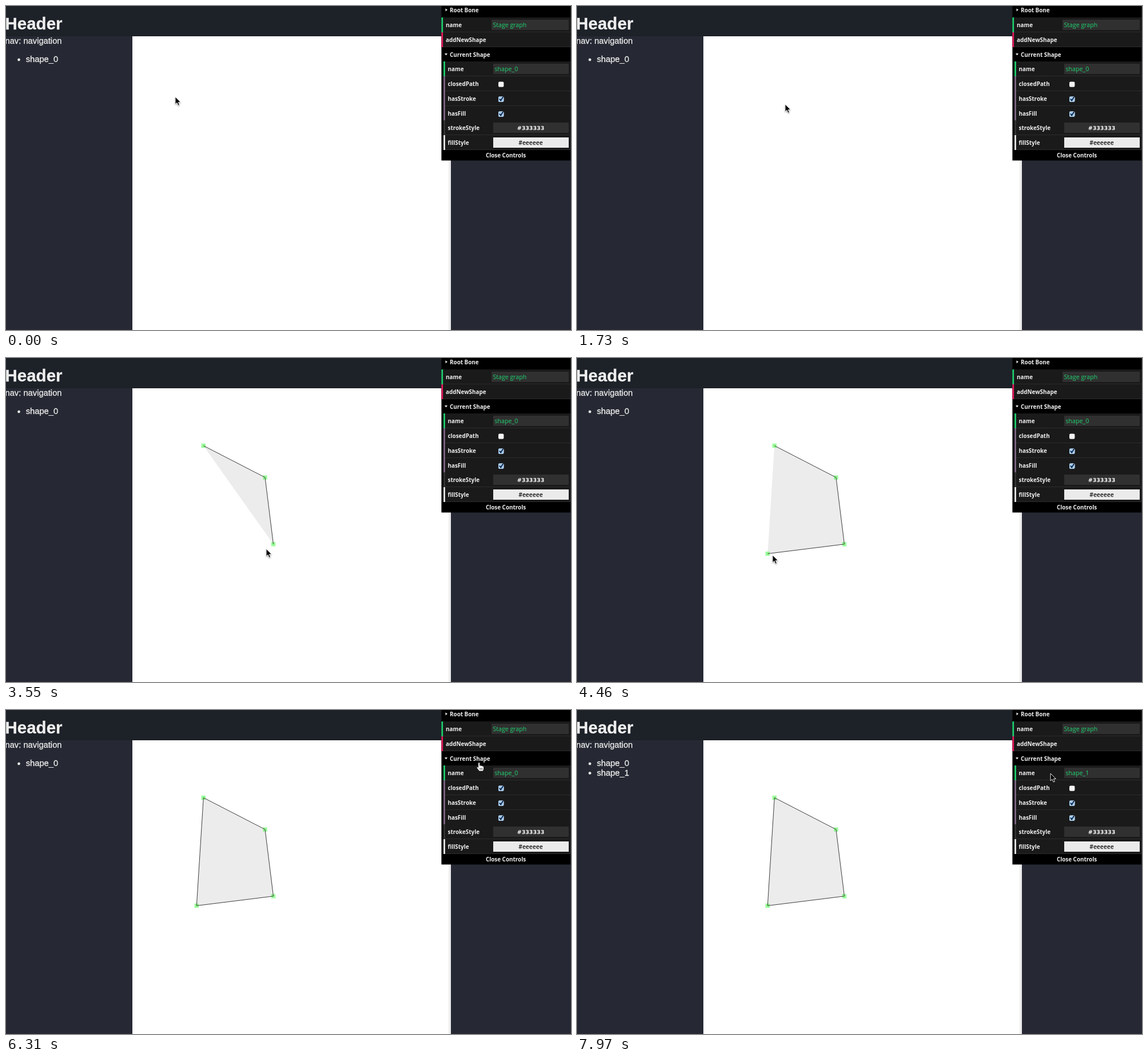
Recreate the animation shown at these times as an HTML page. Size 988 px wide and 567 px high, loop 8 s.

```html
<!DOCTYPE html>
<html lang="en">
<head>
<meta charset="utf-8">
<title>Shape editor</title>
<style>
  html, body { margin: 0; height: 100%; overflow: hidden; background: #262933; }
  svg { display: block; width: 100%; height: 100%; }
  .page { font: 14.72px "Liberation Sans", Arial, sans-serif; fill: #eee; stroke: #eee; stroke-width: .3; }
  .panel { font: 700 9.9px "Open Sans", "Noto Sans", sans-serif; fill: #eee; }
  .value { font-weight: 400; font-size: 10.6px; fill: #1ed36f; }
  .mid { text-anchor: middle; }
  #arrow { filter: drop-shadow(0 1px .8px #0006); }
</style>
</head>
<body>
<svg id="stage" viewBox="0 0 988 567">
  <rect width="988" height="53" fill="#1d2128"/>
  <rect x="221" y="53" width="557" height="514" fill="#ededed"/>
  <rect x="221" y="53" width="553" height="514" fill="#fff"/>

  <g class="page">
    <text x="-1.5" y="41" font-size="29.5" font-weight="700">Header</text>
    <text x="-1.5" y="66">nav: navigation</text>
    <circle cx="22.5" cy="94" r="2.2"/>
    <text x="34.7" y="98">shape_0</text>
    <g id="second">
      <circle cx="22.5" cy="110.5" r="2.2"/>
      <text x="34.7" y="114.5">shape_1</text>
    </g>
  </g>

  <polygon id="fill" fill="#ececec"/>
  <g id="knots" fill="#0f0" fill-opacity=".4"></g>
  <polyline id="line" fill="none" stroke="#333" stroke-width=".95"/>

  <g id="panel" class="panel"></g>

  <path id="arrow" d="M0 0v13l3-2.7 2.1 4.9 2.3-1-2.1-4.7h4.2z" stroke="#fff" stroke-width=".9"/>
  <g id="hand" stroke="#111" stroke-width=".8">
    <path fill="#fff" d="M-1.6 8.5V1.2A1.4 1.4 0 0 1 1.2 1.2V5.2Q3.4 4.4 4 5.8 6 5 6.4 6.6 8.2 6.2 8.2 8V11L6.8 15H.2L-4 9.6Q-4.6 7.4-2.8 7.6Z"/>
    <path d="M1.4 9.5v3M3.4 9.5v3M5.4 9.5v3"/>
  </g>
</svg>
<script>
const $ = id => document.getElementById(id);
const LOOP = 8000, STEP = 86;
const CHECK_AT = 5660, CLOSE_AT = 5870, ADD_AT = 7530;

// Corners of the shape and when each is placed
const POINTS = [
  { at: 2140, pos: [345.3, 153.5] },
  { at: 2690, pos: [453, 209] },
  { at: 3550, pos: [467.5, 325.8] },
  { at: 4460, pos: [333.3, 342.5] }
];

// Pointer strokes: start time, steps, then control and end of a quadratic curve
const HOME = [296, 159];
const STROKES = [
  [360, 9, 402, 140, 340, 137],
  [1370, 5, 350, 160, 364, 172],
  [1800, 5, 392, 196, 346, 153],
  [2260, 10, 500, 190, 449, 284],
  [3120, 4, 453, 310, 466, 325],
  [3550, 9, 419, 370, 333, 342],
  [4460, 1, 338, 344, 342, 345],
  [4550, 3, 440, 335, 537, 314],
  [4900, 8, 740, 240, 863, 137],
  [5870, 10, 845, 92, 788, 72],
  [6740, 4, 792, 66, 791, 60],
  [7530, 6, 800, 0, 828, 111]
];

const GREEN = "#1ed36f", PURPLE = "#806787";
const LEFT = 761.4, RIGHT = 987, PITCH = 25.76;
const ROWS = [
  { kind: "title", label: "Root Bone" },
  { kind: "text", label: "name", edge: GREEN, value: "Stage graph" },
  { kind: "action", label: "addNewShape", edge: "#e61d5f" },
  { kind: "title", label: "Current Shape" },
  { kind: "text", label: "name", edge: GREEN, value: "shape_0" },
  { kind: "check", label: "closedPath", edge: PURPLE },
  { kind: "check", label: "hasStroke", edge: PURPLE },
  { kind: "check", label: "hasFill", edge: PURPLE },
  { kind: "color", label: "strokeStyle", edge: "#333", value: "#333333" },
  { kind: "color", label: "fillStyle", edge: "#eee", value: "#eeeeee" },
  { kind: "close", label: "Close Controls" }
];
const rowTop = i => Math.round(20 + (i - 1) * PITCH);
const rowAt = y => ROWS.findIndex((_, i) => y >= rowTop(i) && y < rowTop(i + 1));

const rect = (x, y, w, h, fill, more = "") =>
  `<rect x="${x}" y="${y}" width="${w}" height="${h}" fill="${fill}" ${more}/>`;
const text = (x, y, str, more = "") => `<text x="${x}" y="${y}" ${more}>${str}</text>`;

function rowMarkup({ kind, label, edge, value }, i) {
  const top = rowTop(i), base = top + 17, inner = i > 3;
  if (kind === "title") {
    const marker = i ? "M767 83h5l-2.5 3.4z" : "M768.5 4.2v5l3.4-2.5z";
    return `<path d="${marker}"/>` + text(776, i ? base - .5 : 11, label);
  }
  if (kind === "close") return text(874, top + 13, label, 'class="mid"');

  const x = inner ? LEFT + 3.7 : LEFT, boxX = inner ? 852 : 849;
  const box = fill => rect(boxX, top + 4, 984 - boxX, 18, fill);
  let out = rect(x, top, RIGHT - x, 25, "#1a1a1a", `id="row${i}"`)
    + rect(x, top + 25, RIGHT - x, 1, "#2c2c2c")
    + rect(x, top, 2.7, 26, edge)
    + text(inner ? 772.5 : 769, base, label);
  if (kind === "text") {
    out += box("#303030") + text(boxX + 2.5, base, value, `class="value" id="value${i}"`);
  } else if (kind === "color") {
    const dark = edge === "#333";
    const font = dark ? "700 9.5px 'DejaVu Sans', sans-serif" : "600 10.4px 'Open Sans', sans-serif";
    out += box(dark ? "#303030" : "#ebebeb")
      + text(917.5, base, value, `class="mid" style="font:${font};fill:${dark ? "#fff" : "#111"}"`);
  } else if (kind === "check") {
    const y = top + 9.4;
    out += rect(861, y, 9.4, 9.4, "#f4f4f4", 'rx="2"')
      + `<g id="tick${i}">` + rect(861, y, 9.4, 9.4, "#a5cdf5", 'rx="2"')
      + `<path d="M863 ${y + 4.2}l2.2 2.9 4-6.4" fill="none" stroke="#0b1c38" stroke-width="1.8"/></g>`;
  }
  return out;
}

$("panel").innerHTML = rect(LEFT, 0, RIGHT - LEFT, 270.4, "#000") + ROWS.map(rowMarkup).join("");
$("knots").innerHTML = POINTS.map(({ pos: [x, y] }) => rect(x - 3.7, y - 3.7, 7.4, 7.4, "#0f0")).join("");
const knots = [...$("knots").children];

const show = (el, on) => el.setAttribute("visibility", on ? "visible" : "hidden");
const curve = (a, b, c, k) => (1 - k) ** 2 * a + 2 * k * (1 - k) * b + k * k * c;

function pointerAt(t) {
  let [x, y] = HOME;
  for (const [start, steps, cx, cy, ex, ey] of STROKES) {
    if (t < start) break;
    const k = Math.min(1, (Math.floor((t - start) / STEP) + 1) / steps);
    x = curve(x, cx, ex, k);
    y = curve(y, cy, ey, k);
  }
  return [x, y];
}

function draw(t) {
  const [x, y] = pointerAt(t);
  const pts = POINTS.filter(p => t >= p.at).map(p => p.pos);
  const closed = t >= CLOSE_AT, added = t >= ADD_AT;

  $("fill").setAttribute("points", pts.join(" "));
  $("line").setAttribute("points", (closed ? [...pts, pts[0]] : pts).join(" "));
  knots.forEach((knot, i) => show(knot, i < pts.length));

  show($("second"), added);
  $("value4").textContent = added ? "shape_1" : "shape_0";
  show($("tick5"), t >= CHECK_AT && !added);

  const over = x > LEFT ? rowAt(y) : -1;
  ROWS.forEach(({ kind }, i) => {
    if (kind === "check" || kind === "action")
      $("row" + i).setAttribute("fill", i === over ? "#111" : "#1a1a1a");
  });
  const hand = over >= 0 && !["text", "color"].includes(ROWS[over].kind);
  show($("hand"), hand);
  show($("arrow"), !hand);
  $(hand ? "hand" : "arrow").setAttribute("transform", `translate(${x} ${y})`);
}

const begin = performance.now();
function tick() {
  draw((performance.now() - begin) % LOOP);
  requestAnimationFrame(tick);
}
tick();
</script>
</body>
</html>
```
